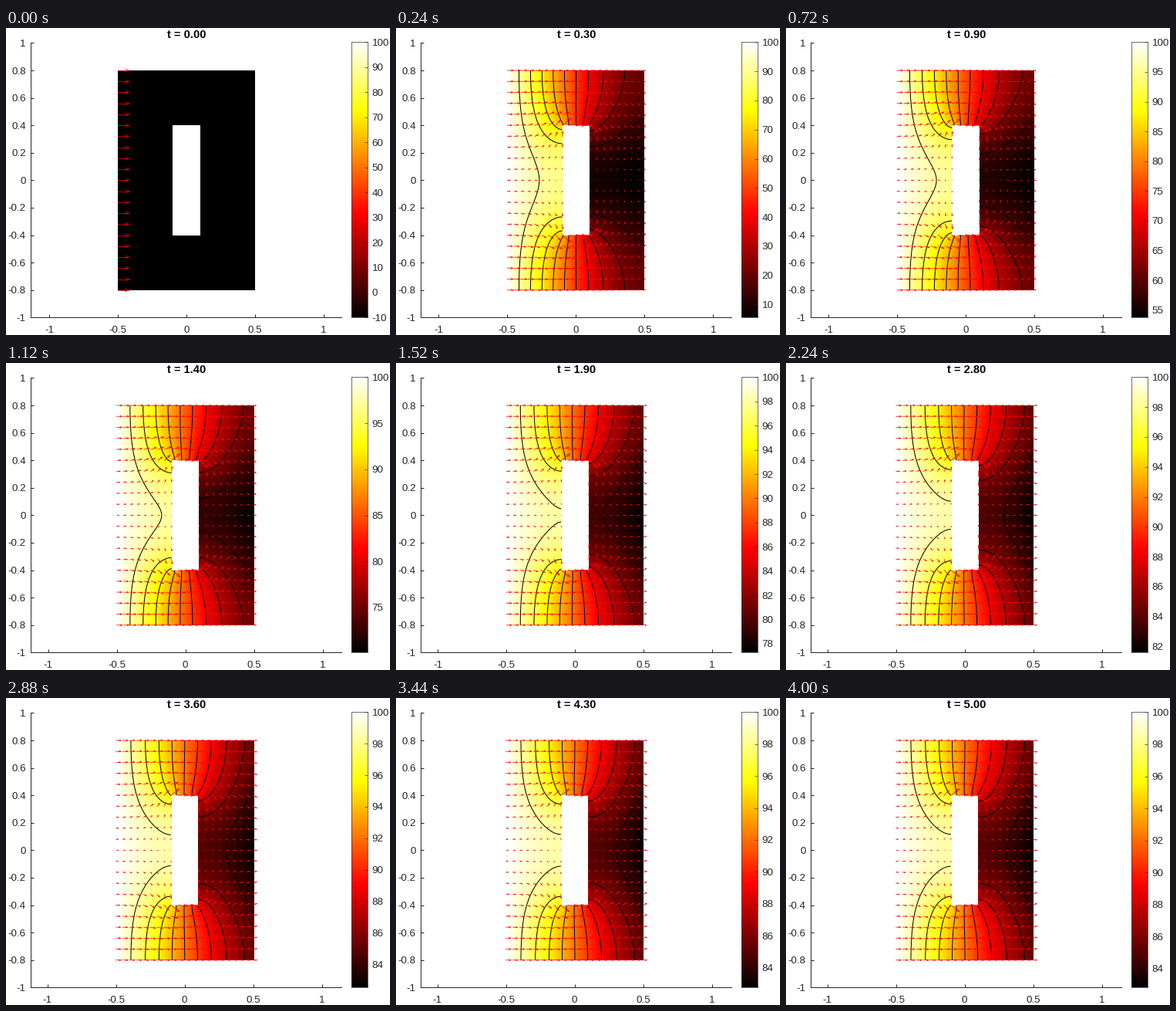
A matplotlib script for the animation above (4.08 s loop, 498 by 398 pixels).

```python
import numpy as np
import matplotlib.pyplot as plt
from matplotlib.animation import FuncAnimation
from matplotlib.collections import LineCollection
from matplotlib.colors import ListedColormap
from matplotlib.patches import Rectangle

W, H, DPI = 498, 398, 96
FRAMES, STEP_MS, DT = 51, 80, 0.1
LEFT, TOP, RIGHT, BOTTOM = 32.4, 19.4, 435.4, 375.4
SCALE = (BOTTOM - TOP) / 2          # pixels per data unit
START, HOT, FLUX = -10.0, 100.0, -10.0
LEVELS = 10
GRAY = "0.15"

plt.rcParams.update({"font.family": "Liberation Sans", "font.size": 10,
                     "axes.unicode_minus": False, "axes.linewidth": 0.75})


def solve_heat(nx=40, ny=40, lx=1.0, ly=0.8):
    """Upper half of the block: heated left, cooled right, slit insulated."""
    hx, hy = lx / nx, ly / ny
    x = np.linspace(-0.5, 0.5, nx + 1)
    y = np.linspace(0, ly, ny + 1)
    idx = np.arange(x.size * y.size).reshape(y.size, x.size)
    cx, cy = np.meshgrid((x[1:] + x[:-1]) / 2, (y[1:] + y[:-1]) / 2)
    solid = (abs(cx) > 0.1) | (cy > 0.4)

    corner = [idx[:-1, :-1], idx[:-1, 1:], idx[1:, :-1], idx[1:, 1:]]
    sw, se, nw, ne = [c[solid] for c in corner]
    K = np.zeros((idx.size, idx.size))
    mass = np.zeros(idx.size)
    for a, b, g in ((sw, se, hy / hx), (nw, ne, hy / hx),
                    (sw, nw, hx / hy), (se, ne, hx / hy)):
        for i, j, s in ((a, a, 1), (b, b, 1), (a, b, -1), (b, a, -1)):
            np.add.at(K, (i, j), s * g / 2)
    for c in (sw, se, nw, ne):
        np.add.at(mass, c, hx * hy / 4)

    load = np.zeros(idx.size)
    load[idx[:, -1]] = FLUX * hy
    load[idx[[0, -1], -1]] /= 2
    left = np.zeros(idx.size, bool)
    left[idx[:, 0]] = True
    free = np.flatnonzero((mass > 0) & ~left)

    root = np.sqrt(mass[free])
    K = K[np.ix_(free, free)]
    lam, V = np.linalg.eigh(K / np.outer(root, root))
    steady = V @ ((V.T @ (load[free] / root)) / lam)
    amp = V.T @ (root * (START - HOT) - steady)

    def field(t):
        u = np.full(idx.size, np.nan)
        u[left] = HOT
        u[free] = HOT + (steady + V @ (amp * np.exp(-lam * t))) / root
        u = u.reshape(idx.shape)
        return np.vstack([u[:0:-1], u])

    return x, np.concatenate([-y[:0:-1], y]), field


def node_flow(u, hx, hy):
    """Heat flow at the nodes, averaged from the cells around each one."""
    a, b, c, d = u[:-1, :-1], u[:-1, 1:], u[1:, :-1], u[1:, 1:]
    cells = (-(b - a + d - c) / (2 * hx), -(c - a + d - b) / (2 * hy))
    ok = np.isfinite(cells[0])
    out = []
    for cell in cells:
        total, count = np.zeros(u.shape), np.zeros(u.shape)
        for r in (slice(0, -1), slice(1, None)):
            for s in (slice(0, -1), slice(1, None)):
                total[r, s] += np.where(ok, cell, 0)
                count[r, s] += ok
        out.append(total / np.maximum(count, 1))
    return out


def arrows(u):
    """Shaft and head lines on a 21 x 21 lattice, longest arrow normalised."""
    fx, fy = (f[::4, ::2] for f in node_flow(u, hx, hy))
    px, py = np.meshgrid(xs[::2], ys[::4])
    size = np.hypot(fx, fy)
    keep = np.isfinite(u[::4, ::2]) & (size > 1e-6 * size.max())
    k = 0.9 * np.hypot(1, 1.6) / 21 / size[keep].max()
    tail = np.stack([px[keep], py[keep]], 1)
    d = k * np.stack([fx[keep], fy[keep]], 1)
    side = np.stack([-d[:, 1], d[:, 0]], 1)
    tip = tail + d
    wings = [tip - 0.33 * d + s * 0.12 * side for s in (1, -1)]
    lines = [np.stack([tail, tip], 1), np.stack([wings[0], tip, wings[1]], 1)]
    return [seg for group in lines for seg in group], tip[:, 0].max()


def tick_step(span):
    return next(s for s in (1, 2, 5, 10, 20) if span / s <= 12)


def pixel_axes(x0, y0, x1, y1):
    return fig.add_axes([x0 / W, 1 - y1 / H, (x1 - x0) / W, (y1 - y0) / H])


xs, ys, field = solve_heat()
hx, hy = xs[1] - xs[0], ys[1] - ys[0]

n = np.linspace(0, 1, 256)
hot = ListedColormap(np.clip(np.stack([n / 0.375, n / 0.375 - 1, n * 4 - 3], 1), 0, 1))

fig = plt.figure(figsize=(W / DPI, H / DPI), dpi=DPI, facecolor="white")
ax = pixel_axes(LEFT, TOP, RIGHT, BOTTOM)
ax.spines[["top", "right"]].set_visible(False)
ax.set_xticks([-1, -0.5, 0, 0.5, 1], ["-1", "-0.5", "0", "0.5", "1"])
ax.set_yticks(np.arange(-5, 6) / 5, [f"{v / 5:g}" for v in range(-5, 6)])
ax.tick_params(direction="in", length=3, width=0.75, color=GRAY, labelcolor=GRAY)
ax.tick_params(axis="x", pad=8.2)
ax.tick_params(axis="y", pad=5)
for s in ax.spines.values():
    s.set_color(GRAY)
title = fig.text(234 / W, 1 - 13 / H, "", ha="center", va="baseline",
                 size=11, weight="bold")

image = ax.imshow(np.zeros((ys.size, xs.size)), cmap=hot, origin="lower",
                  extent=(-0.5 - hx / 2, 0.5 + hx / 2, -0.8 - hy / 2, 0.8 + hy / 2),
                  interpolation="bilinear", aspect="auto", zorder=1)
image.set_clip_path(Rectangle((-0.5, -0.8), 1, 1.6, transform=ax.transData))
ax.add_patch(Rectangle((-0.1, -0.4), 0.2, 0.8, fc="white", ec="none", zorder=2))
flow = LineCollection([], colors="red", linewidths=0.55, capstyle="projecting",
                      zorder=4, clip_on=False)
ax.add_collection(flow, autolim=False)
ax.set_ylim(-1, 1)

bar = pixel_axes(448.4, 18.4, 469.4, BOTTOM)
ramp = bar.imshow(n[:, None], cmap=hot, origin="lower", aspect="auto",
                  interpolation="nearest")
bar.set_xticks([])
bar.yaxis.tick_right()
bar.tick_params(direction="in", length=3, width=0.5, pad=4,
                color=GRAY, labelcolor=GRAY)
for s in bar.spines.values():
    s.set_color(GRAY)
    s.set_linewidth(0.5)
contours = []


def draw(i):
    while contours:
        contours.pop().remove()
    u = field(i * DT)
    lo, hi = np.nanmin(u), np.nanmax(u)

    # the slit takes its edge values so that shading stays clean at the rim
    fill = u.copy()
    for row in fill:
        gap = np.isnan(row)
        row[gap] = np.interp(xs[gap], xs[~gap], row[~gap])
    image.set_data(fill if i else np.full_like(fill, START))
    image.set_clim(lo, hi)
    if i:
        contours.append(ax.contour(xs, ys, np.ma.masked_invalid(u),
                                   np.linspace(lo, hi, LEVELS + 2)[1:-1],
                                   colors="black", linewidths=0.75,
                                   corner_mask=False, zorder=3))

    segs, reach = arrows(u)
    flow.set_segments(segs)
    mid = (max(reach, 0.5) - 0.5) / 2
    half = (RIGHT - LEFT) / SCALE / 2
    ax.set_xlim(mid - half, mid + half)
    ax.set_ylim(-1, 1)

    ramp.set_extent((0, 1, lo, hi))
    step = tick_step(hi - lo)
    marks = np.arange(np.ceil(lo / step - 1e-9) * step, hi + 1e-6, step)
    bar.set_yticks(marks, [f"{m:.0f}" for m in marks])
    bar.set_ylim(lo, hi)
    title.set_text(f"t = {i * DT:.2f}")
    return []


anim = FuncAnimation(fig, draw, frames=FRAMES, interval=STEP_MS,
                     init_func=lambda: [], repeat=True, repeat_delay=0)
plt.show()
```
